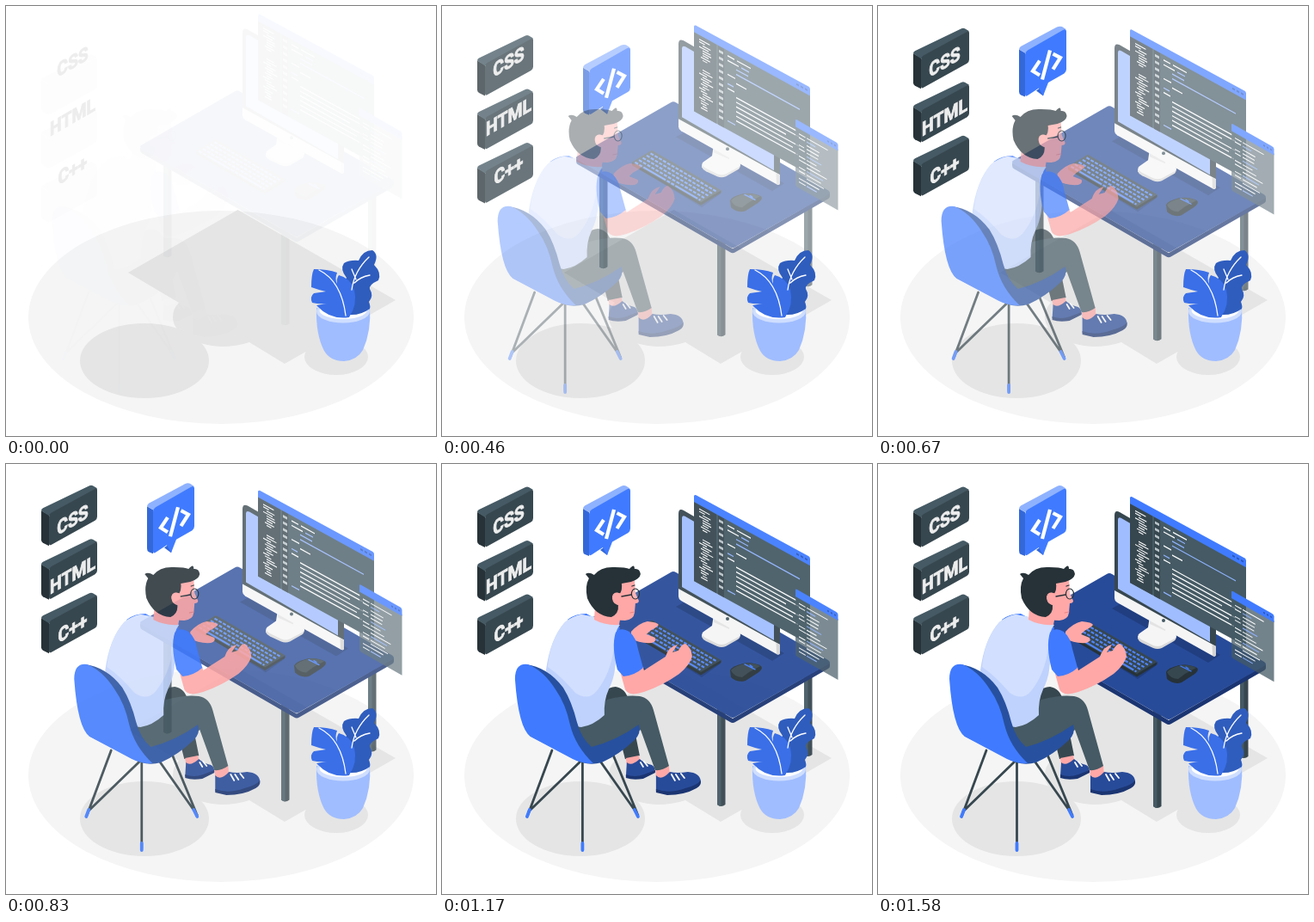
An HTML page that plays this animation: 500x500 px, repeating every 1620 ms.

```html
<!DOCTYPE html>
<html lang="en">
<head>
<meta charset="utf-8">
<title>Developer at a desk</title>
<style>
html, body { margin: 0; width: 100%; height: 100%; overflow: hidden; background: #fff; }
svg { display: block; width: 100vw; height: 100vh; }
text { font: 700 22.5px Roboto, sans-serif; text-anchor: middle; fill: #ededed; stroke: #ededed; stroke-width: .9; }
.line { fill: none; stroke-linecap: round; stroke-linejoin: round; }
</style>
</head>
<body>
<svg viewBox="0 0 500 500">
  <g id="floor">
    <ellipse cx="250" cy="362" rx="224" ry="124" fill="#f5f5f5"/>
    <g fill="#e5e5e5">
      <path d="M269.500 237 L453 342 L324 416 L283 391 Q268 396 250 396 C216 394 194 379 194 362 Q194 352 201 345 L142 310Z"/>
      <ellipse cx="161" cy="412.500" rx="75" ry="43.500"/>
      <ellipse cx="384" cy="408" rx="37" ry="21"/>
    </g>
  </g>

  <g id="tags"></g>
  <g id="words">
    <text transform="matrix(.866 -.5 0 1 77.500 72.500)">CSS</text>
    <text transform="matrix(.866 -.5 0 1 77.500 136.500)">HTML</text>
    <text transform="matrix(.866 -.5 0 1 77.500 198.500)">C++</text>
  </g>

  <g id="bubble">
    <path fill="#3468d9" d="M164 52 L171 56 V107 L166 105 Q164 104 164 101Z M184 100 L192 106 L195 92Z"/>
    <path fill="#8fb2ff" d="M164 52 Q164 50 166 48.500 L208 26 Q211 24.500 214 25.500 L218.500 28.500 L171 56Z"/>
    <path fill="#407bff" d="M171 58 Q171 55 174 53 L215 29.500 Q219 27.500 219 31 V75 Q219 78 216.500 80 L198 90.500 L192 106 L187 97 L174 105.500 Q171 107.500 171 104Z"/>
    <path fill="none" stroke="#fff" stroke-width="4.200" d="M188 65 L180 77 L188 82 M200 53 L191 87 M203.500 57 L212 61.500 L203.500 75"/>
  </g>

  <g id="desk">
    <g id="legs"></g>
    <path fill="#1b3572" d="M156 193 L338 298 L451 233 V237 Q451 239 449 240 L341 302 Q338 304 335 302 L158 200 Q156 199 156 196Z"/>
    <path fill="#284b99" d="M266 128 Q269 126 272 128 L449 230 Q453 233 449 235 L341 296 Q338 298 335 296 L158 195 Q154 192 158 190Z"/>
    <path fill="#203e80" d="M272 168 L288 159 L398 222 L384 231Z M221 200 L243 187 L324 234 L302 250Z"/>
    <path fill="#263238" d="M221 197 L301 243 L324.500 230 V233 L301 247.500 L221 201Z"/>
    <path fill="#37474f" d="M244 183.500 L324.500 230 L301 244 L220.500 197.500Z"/>
    <g id="keys"></g>
    <path fill="#263238" d="M335 242 Q337 237 350 234 Q361 232 371 237 Q374 240 367 245 L353 254 Q344 257 336 250Z"/>
    <path fill="#37474f" d="M336 242 Q340 237 352 234 Q362 233 370 237 L357 244 L349 250 Q339 249 336 242Z"/>
    <path class="line" stroke="#407bff" stroke-width="1.300" d="M352 235 L364 241 M358 236 L361 238"/>

    <path fill="#d9d9d9" d="M302 200 V203 Q303 206 307 208 L320 214 Q325 216 330 214 L344 206 Q347 204 347 200Z"/>
    <path fill="#f5f5f5" d="M304 197 L314 190 L316 177 L334 186 V191 L345 197 Q349 200 345 203 L330 211 Q325 213 320 211 L306 204 Q300 200 304 197Z"/>
    <path fill="#e3e3e3" d="M316 180 L334 190 V194 L316 186Z"/>
    <path fill="#37474f" d="M275 60 Q275 53 281 56 L388 118 Q393 121 393 127 V214 L275 148Z"/>
    <path fill="#a0bdff" d="M279 65 Q279 61 283 63 L386 123 V207 L279 145Z"/>
    <path fill="#f5f5f5" d="M275 147 L393 212 V221 Q393 225 389 223 L278 161 Q275 159 275 156Z"/>
    <path fill="#d4d4d4" d="M388.500 210 L393 212 V221 Q393 225 389 223Z"/>
    <circle cx="332" cy="182" r="2" fill="#455a64"/>

    <g id="editor" transform="matrix(1 .55 0 1 293 38)">
      <path fill="#455a64" d="M0 3 H135 V100 H0Z"/>
      <path fill="#37474f" d="M0 8 H26 V100 H0Z M28 8 H35 V100 H28Z"/>
      <path fill="#407bff" d="M0 8 V1.500 Q0 0 2 -1 L133 -2 Q135 -2 135 0 V8Z"/>
      <path stroke="#2b57b8" stroke-width="2" d="M119 3 H122 M124 3 H127 M129 3 H132"/>
    </g>
    <g id="popup" transform="matrix(1 .57 0 1 411 148)">
      <path fill="#455a64" fill-opacity=".75" d="M0 6 H49.500 V77 H2 Q0 77 0 75Z"/>
      <path fill="#407bff" d="M0 8 V1 Q0 -1 2 -1 H47 Q49.500 -1 49.500 1 V8Z"/>
      <path stroke="#2b57b8" stroke-width="1.800" d="M37 3.500 H39 M41 3.500 H43 M45 3.500 H47"/>
    </g>
  </g>

  <g id="person">
    <!-- far leg and shoe -->
    <path fill="#37474f" d="M187 276 Q184 260 200 259 Q212 261 215 275 L228 339 Q220 344 211 343 L200 300Z"/>
    <path fill="#ffa8a7" d="M212 342 L227 339 L229 348 L220 353 L213 350Z"/>
    <path fill="#284b99" d="M213 347 Q218 352 228 343 Q233 348 242 350 Q246 352 246 358 L232 364 Q220 367 212 363Z"/>
    <path fill="#1b3572" d="M212 361 Q222 365 233 361 L246 356 V359 L232 366 Q220 368 212 365Z"/>
    <path class="line" stroke="#fff" stroke-width="1.800" d="M229 347 L232 352 M233 346 L237 351"/>
    <!-- near leg and shoe -->
    <path fill="#ffa8a7" d="M246 354 L262 350 L263 362 L254 367 L247 364Z"/>
    <path fill="#284b99" d="M247 362 Q253 369 263 358 Q272 360 284 358 Q298 359 299 369 Q294 377 280 380 Q260 386 247 380Z"/>
    <path fill="#1b3572" d="M247 378 Q262 384 281 377 Q294 374 299 368 Q300 374 294 377 Q280 385 260 385 L247 382Z"/>
    <path class="line" stroke="#fff" stroke-width="1.800" d="M265 361 L269 368 M270 361 L274 367 M276 360 L280 365"/>
    <path fill="#455a64" d="M145 300 L190 274 Q212 268 228 270 Q240 272 244 286 L262 351 Q254 357 246 356 L229 309 Q204 333 172 333Z"/>
    <!-- far hand -->
    <path fill="#ffa8a7" d="M218 195 Q227 185 237 183 Q249 184 250 187 Q248 190 240 194 L236 198 L246 202 Q248 206 242 208 Q228 209 218 203Z"/>
    <!-- torso -->
    <path fill="#407bff" d="M144 181 Q153 174 166 174 L184 184 L205 190 L199 214 L150 200Z"/>
    <path fill="#bfd2fd" d="M176 178 L205 187 Q198 196 199 212 Q203 240 192 262 Q186 275 187 292 Q174 304 160 306 L146 304 L119 240 Q124 203 141 184 Q150 177 160 175Z"/>
    <path fill="#d2dffe" d="M176 178 L204 187 Q198 196 198 214 Q194 244 178 264 Q168 276 153 266 Q136 246 121 236 Q124 203 141 184 Q150 177 160 175Z"/>
    <path fill="#ffa8a7" d="M176 168 L206 176 L204 187 Q188 188 175 181Z"/>
    <!-- near arm -->
    <path fill="#ffa8a7" d="M206 244 L232 236 L233 240 L258 224 Q262 212 272 210 L266 219 L273 217 Q277 209 281 209 Q288 213 289 224 Q286 234 274 244 Q254 258 233 265 Q215 271 211 262Z"/>
    <path fill="#407bff" d="M200 196 Q206 189 216 195 Q224 202 226 215 L232 237 Q222 246 209 247 L202 239 Q195 212 200 196Z"/>
    <!-- head -->
    <path fill="#ffa8a7" d="M204 137 L222 134 L223 150 L227 159 Q227 162 223 162 L222 173 Q221 181 211 182 Q200 182 190 176 L192 150Z"/>
    <path fill="#263238" d="M165 128 Q169 125 175 129 Q183 119 199 120 Q212 120 216 122 Q222 115 222 122 Q228 121 229 128 Q228 134 218 137 L207 139 Q208 146 205 151 Q199 147 196 154 Q197 162 203 164 Q204 174 195 178 Q176 177 167 156 Q164 142 169 133Z"/>
    <path fill="#ffa8a7" d="M207 151 Q197 147 196 156 Q197 164 205 164Z"/>
    <path class="line" stroke="#263238" stroke-width="1.300" d="M207 154 L218 152 M219 142 L222 141"/>
    <ellipse cx="223" cy="151" rx="4.500" ry="6" fill="#fff" fill-opacity=".15" stroke="#263238" stroke-width="1.200"/>
    <path class="line" stroke="#e88586" d="M217 173 L222 172"/>
    <!-- chair -->
    <g class="line" stroke="#37474f" stroke-width="2.800">
      <path d="M126 333 L98 408 M160 345 L99 404 M161.500 345 V447 M181 344 L226 408 M197 338 L225 406"/>
      <path stroke="#407bff" stroke-width="3.800" d="M100 402 L97 410 M161.500 441 V449 M222 402 L226 410"/>
    </g>
    <path fill="#27509f" d="M95 233 Q121 236 139 260 Q149 276 155 300 Q160 319 172 329 Q200 322 227 303 Q230 313 222 321 Q204 338 184 347 Q166 352 150 342 L100 316Z"/>
    <path fill="#407bff" d="M83 250 Q83 231 98 233 Q116 240 130 262 Q142 279 147 303 Q153 328 174 348 Q162 349 150 343 L101 317 Q87 307 83 250Z"/>
  </g>

  <g id="plant">
    <path fill="#a0bdff" d="M361 351 Q360 382 370 401 Q377 413 393 413 Q408 412 415 400 Q425 378 423 349Z"/>
    <ellipse cx="392" cy="355" rx="31" ry="13.500" fill="#cfdeff"/>
    <ellipse cx="392" cy="354" rx="27.500" ry="10" fill="#fff"/>
    <path fill="#2f5dbe" d="M399 359 Q389 344 397 331 Q390 322 396 316 Q388 306 393 299 Q400 295 410 296 Q415 284 426 284 Q434 289 428 301 Q437 310 433 319 Q422 324 423 329 Q428 337 422 344 Q424 349 423 352 Q412 360 399 359Z"/>
    <path fill="#3a6fe8" d="M358 306 Q374 306 385 310 Q382 318 385 323 Q384 317 387 313 Q400 316 405 330 Q409 347 399 362 Q377 365 363 350 L361 348 L373 346 Q364 347 356 345 Q353 338 358 334 L372 332 Q363 330 355 327 Q355 312 358 306Z"/>
    <path class="line" stroke="#fff" stroke-width="1.300" d="M364 307 Q390 320 395 360 M422 292 Q405 308 402 330 M402 306 L407 318 M423 313 Q412 315 405 322"/>
  </g>
</svg>

<script>
const $ = id => document.getElementById(id);

function add(id, d, attrs) {
  const p = document.createElementNS('http://www.w3.org/2000/svg', 'path');
  p.setAttribute('d', d);
  for (const k in attrs) p.setAttribute(k, attrs[k]);
  $(id).append(p);
}

let seed = 7;
const rnd = () => (seed = seed * 16807 % 2147483647) / 2147483647;

// Label slabs
for (const y of [0, 62.5, 125]) {
  const at = { transform: `translate(0 ${y})` };
  add('tags', 'M41 56 L50 61 V97 L43 93.500 Q41 92 41 90Z', { fill: '#263238', ...at });
  add('tags', 'M41 56 Q41 54 43 53 L97 27 Q99 26 101 27 L106 30 L50 62Z', { fill: '#455a64', ...at });
  add('tags', 'M50 63 Q50 60 52.500 58.500 L103 31 Q106 29 106 32 V63 Q106 66 103.500 67.500 L53 95.500 Q50 97.500 50 94Z', { fill: '#37474f', ...at });
}

// Desk legs: left x, top, bottom
for (const [x, top, end] of [[183, 195, 319], [320, 285, 398], [421, 235, 340]]) {
  add('legs', `M${x} ${top} V${end} q4.700 4 9.500 0 V${top}Z`, { fill: '#37474f' });
  add('legs', `M${x} ${top} V${end} q2 2 4.500 2 V${top}Z`, { fill: '#455a64' });
}

// Keyboard rows
for (let r = 0; r < 5; r++) {
  const x = 242.5 - r * 4.5, y = 187 + r * 2.6;
  add('keys', `M${x} ${y} l76 44`, {
    stroke: '#4f85ff', 'stroke-width': 2.1, 'stroke-dasharray': r == 4 ? '4 1.600 4 1.600 30 1.600' : '4 1.600'
  });
}

const rule = (id, x, y, w, color = '#fff', h = 1.4) =>
  add(id, `M${x} ${y} h${w}`, { stroke: color, 'stroke-width': h });

// Editor: file list, markers, code
for (let y = 13; y < 94; y += 2.8) {
  if (y > 38 && y < 45) continue;
  const x = 6 + Math.floor(rnd() * 3) * 2;
  rule('editor', x, y, 5 + rnd() * 8, '#fff', 1.2);
}
for (let y = 14; y < 96; y += 7.6) rule('editor', 29, y, 5, '#b8c3c8', 3);
const blue = '#8fb2ff';
[[39, 8], [39, 13], [49, 14, blue], [49, 74, blue], [39, 9], [49, 12], [39, 7, blue], [39, 8],
 [49, 70], [49, 74], [49, 58], [49, 74], [49, 66], [49, 72], [39, 9, blue]]
  .forEach(([x, w, c], i) => rule('editor', x, 14 + i * 5.4, w, c));
rule('editor', 50, 14, 16);
rule('editor', 55, 19.4, 9, blue);

// Popup text
for (let i = 0; i < 14; i++) {
  const y = 14 + i * 4.3;
  if (i % 3 != 2) rule('popup', 4, y, 5 + rnd() * 4, '#fff', 1.1);
  rule('popup', 13, y, 7 + rnd() * 19, i % 4 == 1 ? blue : '#fff', 1.1);
}

function bezier(x1, y1, x2, y2) {
  const at = (a, b, s) => 3 * (1 - s) * (1 - s) * s * a + 3 * (1 - s) * s * s * b + s * s * s;
  return x => {
    if (x <= 0) return 0;
    if (x >= 1) return 1;
    let lo = 0, hi = 1;
    for (let i = 0; i < 24; i++) {
      const m = (lo + hi) / 2;
      if (at(x1, x2, m) < x) lo = m; else hi = m;
    }
    return at(y1, y2, lo);
  };
}
const spring = bezier(.36, -.01, .5, 1.38);
const easeOut = bezier(0, 0, .58, 1);

const LOOP = 1620, LEAD = 40;
const deskFade = [[0, 0], [40, .035], [290, .42], [500, .53], [710, .66], [1040, .89], [1370, .98], [1540, 1]];

function mix(table, t) {
  const i = table.findIndex(([k]) => k > t);
  if (i < 0) return table[table.length - 1][1];
  const [t0, a] = table[i - 1], [t1, b] = table[i];
  return a + (b - a) * (t - t0) / (t1 - t0);
}

function pose(id, x, y, alpha) {
  $(id).setAttribute('transform', `translate(${x.toFixed(2)} ${y.toFixed(2)})`);
  $(id).setAttribute('opacity', Math.max(0, Math.min(1, alpha)).toFixed(3));
}

const start = performance.now();
function draw() {
  const t = (performance.now() - start) % LOOP + LEAD;
  const tag = spring(t / 1000), talk = spring((t - 140) / 800), man = spring(t / 1510);
  pose('tags', 0, 30 * (1 - tag), tag);
  pose('bubble', 0, 56 * (1 - talk), talk);
  pose('desk', 0, -30 * (1 - easeOut(t / 1540)), mix(deskFade, t));
  pose('person', -30 * (1 - man), 0, man);
  requestAnimationFrame(draw);
}
draw();
</script>
</body>
</html>
```
